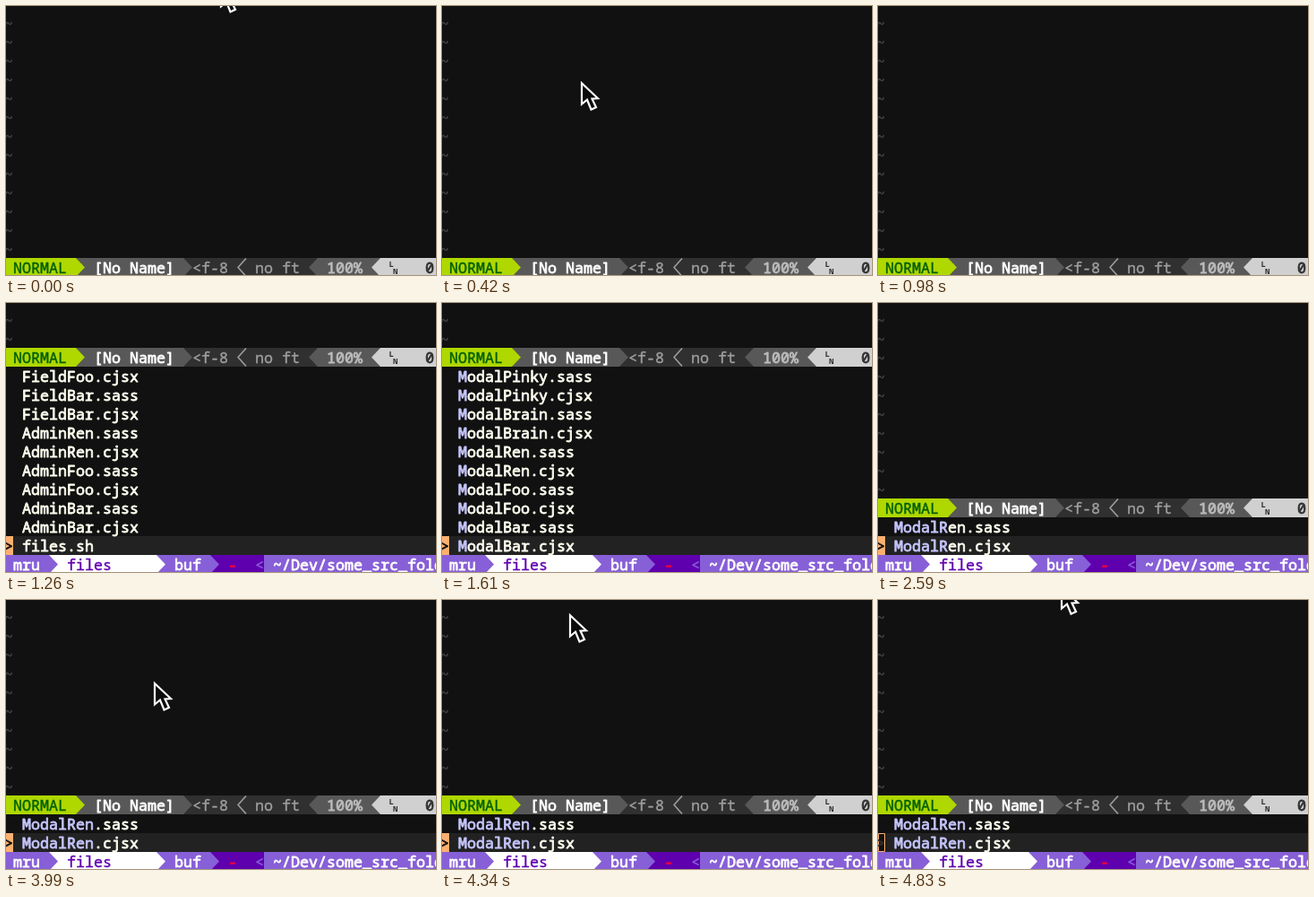
Write an HTML page with a canvas that moves like this. It is 480 px wide and 300 px high and loops after 4.97 s.

```html
<!DOCTYPE html>
<html lang="en">
<head>
<meta charset="utf-8">
<title>Fuzzy file finder</title>
<style>
  html, body { margin: 0; width: 100%; height: 100%; overflow: hidden; background: #111; }
  canvas { display: block; width: 480px; height: 300px; }
</style>
</head>
<body>
<canvas id="stage" width="480" height="300"></canvas>
<script>
const ctx = document.getElementById('stage').getContext('2d');
const LOOP = 4970, STEP = 70;
const ROW = 21, BOTTOM = 281;
const MONO = '"Noto Sans Mono", "DejaVu Sans Mono", monospace';
const FONT = '16.667px ' + MONO;
const MEDIUM = 0.4, HEAVY = 0.8;
const GREY = '#585858', DARK = '#303030', LIGHT = '#d0d0d0';
const PURPLE = '#875fd7', DEEP = '#5f00af', ORANGE = '#ffaf6f';
const IVORY = '#fffff0', MATCH = '#c6c6ff';

const pair = name => [name + '.sass', name + '.cjsx'];
const allFiles = ['FieldFoo.cjsx', ...pair('FieldBar'), ...pair('AdminRen'),
  ...pair('AdminFoo'), ...pair('AdminBar'), 'files.sh'];
const modals = ['Pinky', 'Brain', 'Ren', 'Foo', 'Bar'].flatMap(n => pair('Modal' + n));

// moments at which each letter of the query lands
const OPEN = 1260, BLUR = 4830;
const query = 'ModalRen';
const keys = [1610, 1750, 1890, 1960, 2030, 2590, 2730, 2800];

function rect(x, y, w, h, color) {
  ctx.fillStyle = color;
  ctx.fillRect(x, y, w, h);
}

// a thin outline gives weights between regular and bold
function text(str, x, row, color, weight = MEDIUM) {
  ctx.font = FONT;
  ctx.fillStyle = ctx.strokeStyle = color;
  ctx.lineWidth = weight;
  ctx.lineJoin = 'round';
  ctx.fillText(str, x, row + 17);
  ctx.strokeText(str, x, row + 17);
}

// solid powerline separator; base and tip give its direction
function arrow(base, tip, y, color) {
  ctx.fillStyle = color;
  ctx.beginPath();
  ctx.moveTo(base, y);
  ctx.lineTo(tip, y + ROW / 2);
  ctx.lineTo(base, y + ROW);
  ctx.fill();
}

function statusBar(y) {
  rect(0, y, 480, ROW, DARK);
  rect(0, y, 78, ROW, '#afd700');
  rect(78, y, 120, ROW, GREY);
  arrow(78, 88, y, '#afd700');
  arrow(198, 208, y, GREY);
  rect(348, y, 70, ROW, GREY);
  arrow(348, 338, y, GREY);
  rect(418, y, 62, ROW, LIGHT);
  arrow(418, 408, y, LIGHT);

  text('NORMAL', 8, y, '#005f00');
  text('[No Name]', 98, y, '#fff', HEAVY);
  text('<f-8', 208, y, '#9e9e9e');
  text('no ft', 278, y, '#9e9e9e');
  text('100%', 358, y, '#bcbcbc', HEAVY);
  text('0', 468, y, DARK, HEAVY);

  ctx.strokeStyle = '#9e9e9e';
  ctx.lineWidth = 1.6;
  ctx.beginPath();
  ctx.moveTo(268, y + 0.5);
  ctx.lineTo(259, y + ROW / 2);
  ctx.lineTo(268, y + ROW - 0.5);
  ctx.stroke();

  ctx.font = 'bold 9px ' + MONO;
  ctx.fillStyle = DARK;
  ctx.fillText('L', 427.5, y + 10);
  ctx.fillText('N', 432, y + 18);
}

function finderBar(y) {
  rect(0, y, 480, ROW, PURPLE);
  rect(48, y, 120, ROW, '#fff');
  arrow(48, 58, y, PURPLE);
  arrow(168, 178, y, '#fff');
  rect(228, y, 60, ROW, DEEP);
  arrow(228, 238, y, PURPLE);
  text('mru', 8, y, '#fff', HEAVY);
  text('files', 68, y, DEEP);
  text('buf', 188, y, '#fff', HEAVY);
  text('-', 248, y, '#f0003c', HEAVY);
  text('<', 278, y, PURPLE);
  text('~/Dev/some_src_folder', 298, y, '#fff', HEAVY);
}

function fileList(files, top, typed, focused) {
  const last = BOTTOM - ROW;
  rect(8, last, 472, ROW, '#222');
  if (focused) {
    rect(0, last, 8, ROW, ORANGE);
  } else {
    ctx.strokeStyle = ORANGE;
    ctx.lineWidth = 1;
    ctx.strokeRect(0.5, last + 0.5, 7, ROW - 1);
  }
  text('>', -2, last, focused ? '#111' : DARK, HEAVY);
  files.forEach((name, i) => {
    const y = top + i * ROW;
    text(name.slice(0, typed), 18, y, MATCH, HEAVY);
    text(name.slice(typed), 18 + typed * 10, y, IVORY, HEAVY);
  });
}

function bezier(a, b, c, d, t) {
  const u = 1 - t;
  return a.map((v, i) =>
    u * u * u * v + 3 * u * u * t * b[i] + 3 * u * t * t * c[i] + t * t * t * d[i]);
}

function pointerAt(time) {
  if (time < 980) {
    const n = Math.max(0, Math.min(6, Math.floor(time / STEP) - 1));
    return bezier([239, -25], [200, 20], [125, 85], [167, 92], n / 6);
  }
  if (time < 3990) return null;
  if (time < 4620) {
    const n = Math.min(7, Math.floor((time - 3990) / STEP));
    return bezier([165, 91], [95, 80], [110, 5], [202, -8], n / 7);
  }
  return time < 4690 ? [203, -12] : [204, -16];
}

function pointer([x, y]) {
  const shape = [[1, 2], [1, 25.5], [7, 20.5], [11.5, 31.5], [17, 29], [12.5, 19.5], [19, 19]];
  ctx.beginPath();
  shape.forEach(([px, py]) => ctx.lineTo(Math.round(x) + px, Math.round(y) + py));
  ctx.closePath();
  ctx.fillStyle = '#0b0b0b';
  ctx.fill();
  ctx.strokeStyle = '#fff';
  ctx.lineWidth = 2.2;
  ctx.lineJoin = 'miter';
  ctx.stroke();
}

function draw(time) {
  const open = time >= OPEN;
  const typed = keys.filter(k => time >= k).length;
  const files = !typed ? allFiles
    : modals.filter(n => n.startsWith(query.slice(0, typed)));
  const top = BOTTOM - files.length * ROW;
  const status = open ? top - ROW : BOTTOM;

  rect(0, 0, 480, 300, '#111');
  for (let y = status - ROW; y > -ROW; y -= ROW) text('~', -2, y + 1, '#444');
  statusBar(status);
  if (open) {
    fileList(files, top, typed, time < BLUR);
    finderBar(BOTTOM);
  }
  const pos = pointerAt(time);
  if (pos) pointer(pos);
}

const start = performance.now();
function tick() {
  draw((performance.now() - start) % LOOP);
  requestAnimationFrame(tick);
}
tick();
</script>
</body>
</html>
```
